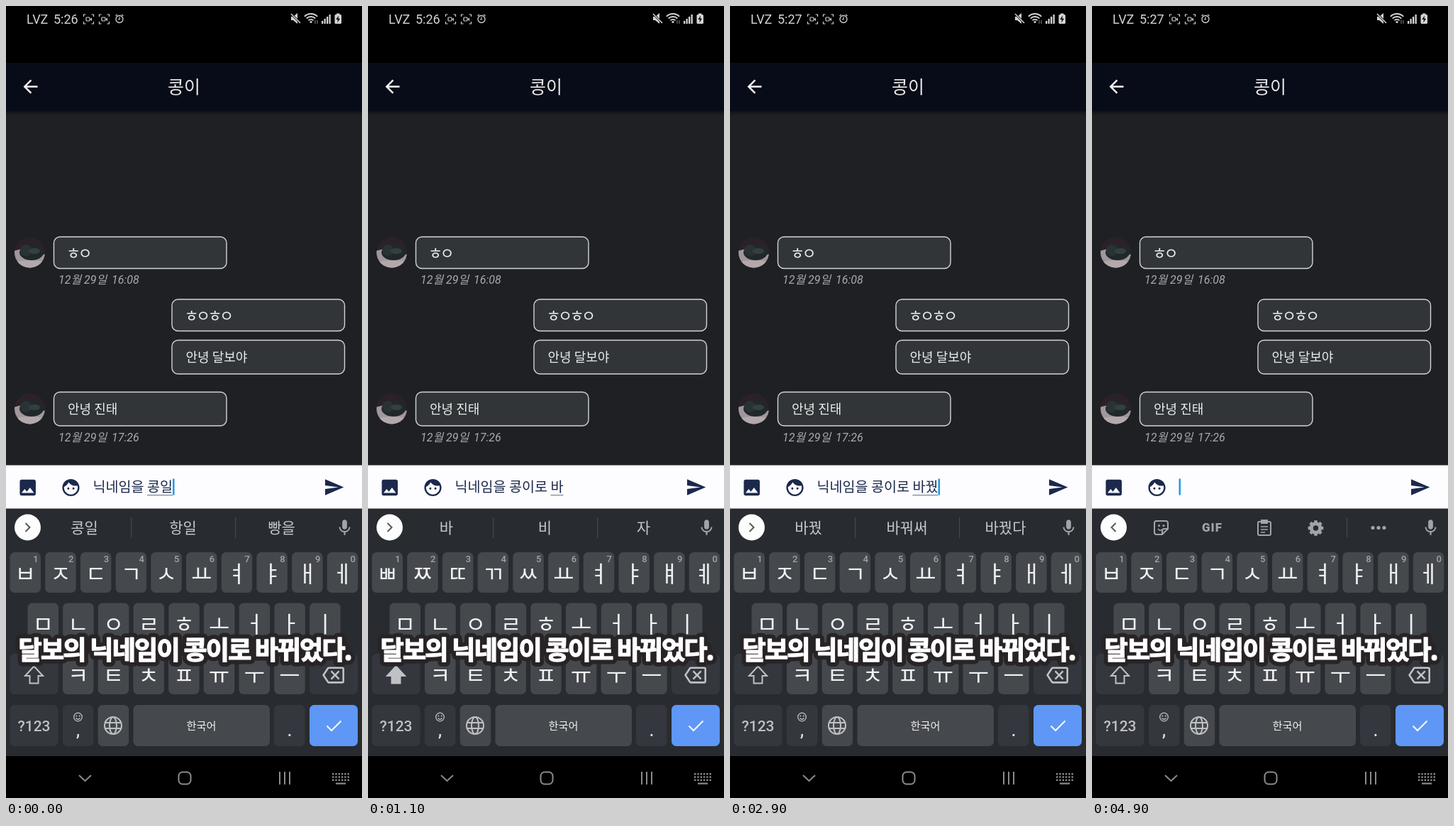
An HTML page with a canvas that plays this animation: 502x1115 px, repeating every 5000 ms.

```html
<!DOCTYPE html>
<html lang="ko">
<head>
<meta charset="utf-8">
<style>
  html, body { margin: 0; width: 100%; height: 100%; overflow: hidden; background: #000; }
  canvas { display: block; }
</style>
</head>
<body>
<canvas id="stage" width="502" height="1115"></canvas>
<script>
const g = document.getElementById('stage').getContext('2d');
const KR = '"Noto Sans CJK KR", "Noto Sans CJK", sans-serif';
const LATIN = 'Roboto, ' + KR;
const NAVY = '#1c294c', PALE = '#bfc1c5', DIM = '#a2a4a9';
const TAU = Math.PI * 2;

// Material-style glyphs on a 24 unit grid
const ICONS = {
  back: 'M20 11H7.83l5.59-5.59L12 4l-8 8 8 8 1.41-1.41L7.83 13H20v-2z',
  send: 'M2.01 21L23 12 2.01 3 2 10l15 2-15 2z',
  image: 'M21 19V5c0-1.1-.9-2-2-2H5c-1.1 0-2 .9-2 2v14c0 1.1.9 2 2 2h14c1.1 0 2-.9 2-2zM8.5 13.5l2.5 3.01L14.5 12l4.5 6H5l3.5-4.5z',
  face: 'M9 11.75c-.69 0-1.25.56-1.25 1.25s.56 1.25 1.25 1.25 1.25-.56 1.25-1.25-.56-1.25-1.25-1.25zm6 0c-.69 0-1.25.56-1.25 1.25s.56 1.25 1.25 1.25 1.25-.56 1.25-1.25-.56-1.25-1.25-1.25zM12 2C6.48 2 2 6.48 2 12s4.48 10 10 10 10-4.48 10-10S17.52 2 12 2zm0 18c-4.41 0-8-3.59-8-8 0-.29.02-.58.05-.86 2.36-1.05 4.23-2.98 5.21-5.37C11.07 8.33 14.05 10 17.42 10c.78 0 1.53-.09 2.25-.26.21.71.33 1.47.33 2.26 0 4.41-3.59 8-8 8z',
  erase: 'M22 3H7c-.69 0-1.23.35-1.59.88L0 12l5.41 8.11c.36.53.9.89 1.59.89h15c1.1 0 2-.9 2-2V5c0-1.1-.9-2-2-2zm0 16H7.07L2.4 12l4.66-7H22v14zm-11.59-2L14 13.41 17.59 17 19 15.59 15.41 12 19 8.41 17.59 7 14 10.59 10.41 7 9 8.41 12.59 12 9 15.59z',
  mic: 'M12 14c1.66 0 3-1.34 3-3V5c0-1.66-1.34-3-3-3S9 3.34 9 5v6c0 1.66 1.34 3 3 3zm5.3-3c0 3-2.54 5.1-5.3 5.1S6.7 14 6.7 11H5c0 3.41 2.72 6.23 6 6.72V21h2v-3.28c3.28-.48 6-3.3 6-6.72h-1.7z'
};
const ROWS = [
  { x: 5.5, y: 769, keys: 'ㅂㅈㄷㄱㅅㅛㅕㅑㅐㅔ', shifted: 'ㅃㅉㄸㄲㅆㅛㅕㅑㅒㅖ' },
  { x: 30.5, y: 840.5, keys: 'ㅁㄴㅇㄹㅎㅗㅓㅏㅣ' },
  { x: 80, y: 912, keys: 'ㅋㅌㅊㅍㅠㅜㅡ' }
];

// [time, committed text, word being composed, suggestions]
const SAID = '닉네임을 ', NAMED = SAID + '콩이로 ';
const TYPING = [
  [0, SAID, '콩일', '콩일 항일 빵을'],
  [200, SAID, '콩이로', '콩이로 항이로 빵으로'],
  [400, NAMED, '', ''],
  [500, NAMED, 'ㅂ', 'ㅂ ㅈ ㅂㅂ'],
  [600, NAMED, '바', '바 비 자'],
  [1400, NAMED, '밖', '밖 박 밖에'],
  [2100, NAMED, '바꾸', '바꾸 자꾸 바꿀'],
  [2600, NAMED, '바꿔', '바꿔 바꿔서 바꿔야'],
  [2900, NAMED, '바꿨', '바꿨 바꿔써 바꿨다'],
  [3200, NAMED, '바꿨ㄱ', '바꿨ㄱ 바꿨 바꿔써'],
  [3500, NAMED, '바꿨구', '바꿨구 바꿨고 바꿨구나'],
  [3600, NAMED, '바꿨군', '바꿨군 바꿨구나 바꿨군요'],
  [3800, NAMED, '바꿨구나', '바꿨구나 바꿨더니']
];
const PRESSES = [[100, 'ㅗ'], [500, 'ㅂ'], [600, 'ㅏ'], [1300, 'ㄲ'], [2000, 'ㅜ'], [2500, 'ㅓ'],
  [2800, 'ㅆ'], [3100, 'ㄱ'], [3400, 'ㅜ'], [3500, 'ㄴ'], [3700, 'ㅏ']];
const SENT = 4100;

const within = (t, a, b) => t >= a && t < b;

function rect(x, y, w, h, color) {
  g.fillStyle = color;
  g.fillRect(x, y, w, h);
}
function box(x, y, w, h, r, fill, line, width = 1.4) {
  g.beginPath();
  g.roundRect(x, y, w, h, r);
  if (fill) { g.fillStyle = fill; g.fill(); }
  if (line) { g.strokeStyle = line; g.lineWidth = width; g.stroke(); }
}
function oval(x, y, rx, ry, fill, line, width = 1.5) {
  g.beginPath();
  g.ellipse(x, y, rx, ry, 0, 0, TAU);
  if (fill) { g.fillStyle = fill; g.fill(); }
  if (line) { g.strokeStyle = line; g.lineWidth = width; g.stroke(); }
}
function stroke(path, color, width) {
  g.strokeStyle = color;
  g.lineWidth = width;
  g.stroke(new Path2D(path));
}
function fill(path, color) {
  g.fillStyle = color;
  g.fill(new Path2D(path));
}
function text(s, x, y, font, color, align = 'left', spacing = 0) {
  g.font = font;
  g.letterSpacing = spacing + 'px';
  g.fillStyle = color;
  g.textAlign = align;
  g.fillText(s, x, y);
}
function icon(name, cx, cy, size, color) {
  g.save();
  g.translate(cx - size / 2, cy - size / 2);
  g.scale(size / 24, size / 24);
  fill(ICONS[name], color);
  g.restore();
}

function statusBar(t) {
  const c = '#d4d4d4';
  text('LVZ', 29, 25, '18px ' + LATIN, c);
  text(t < 1800 ? '5:26' : '5:27', 67, 25, '18px ' + LATIN, c);
  [109.5, 131.5].forEach((x, i) => {
    stroke(`M${x} 15v-3h3m8 0h3v3m0 7v3h-3m-8 0h-3v-3`, c, 1.2);
    if (i || !within(t % 1000, 350, 850)) {
      box(x + 3.5, 16, 5, 5, 1, null, c, 1.2);
      fill(`M${x + 9} 18.5l2.5-2v5z`, c);
    }
  });
  oval(160, 18.5, 5, 5, null, c, 1.3);
  stroke('M160 15.5v3.5h-2M154.5 14l2.5-2M165.5 14l-2.5-2', c, 1.2);
  fill('M402 15h3l6-5v15l-6-5h-3z', c);
  stroke('M401 10l14 14', '#000', 3);
  stroke('M402 11l13 13', c, 1.5);
  [13, 9, 5].forEach(r => {
    g.beginPath();
    g.arc(430, 24, r, -2.35, -0.79);
    g.strokeStyle = c;
    g.lineWidth = 1.8;
    g.stroke();
  });
  oval(430, 22.5, 1.6, 1.6, c);
  stroke('M436 25v-5m3 0v5', '#888', 1);
  for (let i = 0; i < 4; i++) rect(445 + i * 3.5, 21 - i * 3, 2.3, 4 + i * 3, c);
  box(463.5, 12, 9.5, 13, 1.5, c);
  rect(466, 10.5, 4.5, 2, c);
  fill('M469 13.5l-3.7 5.5h2.6l-.7 4.5 3.9-5.8h-2.6z', '#000');
}

function avatar(y) {
  g.save();
  g.beginPath();
  g.arc(33.5, y, 21.5, 0, TAU);
  g.clip();
  rect(10, y - 23, 48, 46, '#2a2228');
  g.translate(0, y);
  fill('M10 -2L22 -5L46 4L58 2V24H10z', '#a0979b');
  fill('M10 14Q33 8 58 14V24H10z', '#b3a9ad');
  oval(36, 0, 17, 11, '#20282b');
  oval(28, -3, 8, 8, '#293235');
  oval(40, -2, 8, 4, '#343f41');
  g.restore();
}

function bubble(x, y, h, message) {
  const jamo = /^[ㄱ-ㅎ]+$/.test(message);
  box(x, y, 243.5, h, 8.5, '#313538', '#d2d4d4');
  if (jamo) text(message, x + 17.5, y + h / 2 + 9, '22px ' + KR, '#eceded', 'left', -3.7);
  else text(message, x + 19.5, y + h / 2 + 7, '18px ' + KR, '#eceded');
}

function stamp(time, y) {
  const font = 'italic 16px ' + LATIN;
  text('12월 29일', 74, y, font, '#a9aaad');
  text(time, 149, y, font, '#a9aaad');
}

function chat() {
  rect(0, 80, 502, 68, '#080c18');
  rect(0, 148, 502, 499, '#1f2024');
  const shade = g.createLinearGradient(0, 148, 0, 154);
  shade.addColorStop(0, '#121318');
  shade.addColorStop(1, '#1f2024');
  rect(0, 148, 502, 6, shade);
  icon('back', 34.5, 113.5, 30, '#f4f4f5');
  text('콩이', 251, 123, '25px ' + KR, '#e9eaec', 'center');
  avatar(347);
  avatar(567);
  bubble(67.5, 325, 44.5, 'ㅎㅇ');
  bubble(234, 413, 44.5, 'ㅎㅇㅎㅇ');
  bubble(234, 470.5, 47.5, '안녕 달보야');
  bubble(67.5, 543.5, 47.5, '안녕 진태');
  stamp('16:08', 391);
  stamp('17:26', 613);
}

function inputBar(t, [edited, done, word]) {
  rect(0, 646.5, 502, 61, '#fdfcfe');
  if (within(t, 3900, 4300)) {
    g.save();
    g.beginPath();
    g.rect(0, 646.5, 502, 61);
    g.clip();
    const p = (t - 3900) / 400;
    oval(462, 677, 36 + 10 * p, 36 + 10 * p, `rgba(0,0,0,${0.02 + 0.06 * Math.sin(Math.PI * p)})`);
    g.restore();
  }
  icon('image', 30.7, 678, 30, NAVY);
  icon('face', 91.5, 678, 29, NAVY);
  icon('send', 462.5, 677.5, 30, NAVY);
  let caret = 122.5;
  if (t < SENT) {
    text(done + word, caret, 684, '19.6px ' + KR, NAVY);
    const start = caret + g.measureText(done).width;
    caret += g.measureText(done + word).width;
    if (word) rect(start, 688, caret - start, 1.2, '#7a849b');
  }
  if ((t - edited) % 1000 < 500) rect(caret, 665.5, 2.5, 23, '#1d9be2');
}

function toolbar() {
  const c = DIM;
  stroke('M104 725H91q-3 0-3 3v13q0 3 3 3h8l8-8v-8q0-3-3-3M99 744v-5q0-3 3-3h5', c, 2);
  oval(94.5, 731.5, 1.5, 1.5, c);
  oval(101, 731.5, 1.5, 1.5, c);
  stroke('M93 736q3 4 6 1', c, 1.6);
  text('GIF', 169.5, 740, '900 17px ' + LATIN, c, 'center', 1);
  box(234, 726, 18, 19, 2, null, c, 2);
  rect(238, 723, 10, 6, c);
  stroke('M238 733h10m-10 4h10m-10 4h6', c, 1.6);
  oval(315.5, 735, 6.2, 6.2, null, c, 5);
  for (let i = 0; i < 8; i++) {
    const a = i * TAU / 8;
    stroke(`M${315.5 + 8 * Math.cos(a)} ${735 + 8 * Math.sin(a)}L${315.5 + 10.8 * Math.cos(a)} ${735 + 10.8 * Math.sin(a)}`, c, 4.5);
  }
  rect(359, 720, 1.2, 28, '#44474c');
  [396, 404, 412].forEach(x => oval(x, 734.5, 2.6, 2.6, c));
}

function suggestionBar(t, words) {
  const sent = t >= SENT;
  oval(30.5, 734, 18.5, 18.5, '#fdfdfd');
  stroke(sent ? 'M33.5 728l-6 6 6 6' : 'M27.5 728l6 6-6 6', '#55585d', 2);
  icon('mic', 477.5, 734.5, 27, DIM);
  if (sent) return toolbar();
  if (!words) return;
  words.split(' ').forEach((w, i) => text(w, 110.5 + 139 * i, 742, '21px ' + KR, '#c6c8cc', 'center'));
  [176, 323].forEach(x => rect(x, 720, 1.2, 29, '#44474c'));
}

function keyboard(t) {
  const KEY = '#45484c', DARK = '#34373d', JAMO = '500 32px ' + KR;
  const shifted = within(t, 900, 1400) || within(t, 2700, 2900);
  const pressed = PRESSES.find(([at]) => within(t, at, at + 100));
  let popup;
  ROWS.forEach((row, r) => {
    const keys = shifted && row.shifted || row.keys;
    [...keys].forEach((key, i) => {
      const x = row.x + 49.7 * i, cx = x + 21.75;
      box(x, row.y, 43.5, 57, 6.5, KEY);
      text(key, cx, row.y + 41.5, JAMO, '#f0f1f2', 'center');
      if (!r) text((i + 1) % 10, x + 36.5, 783, '500 13px ' + LATIN, DIM, 'center');
      if (pressed && pressed[1] === key) popup = { key, cx, y: row.y };
    });
  });
  box(5.5, 912, 68, 57, 6.5, DARK);
  const arrow = 'M39.5 929.5L27 943h6.5v10.5h12V943H52z';
  if (shifted) fill(arrow, PALE);
  stroke(arrow, PALE, 2);
  box(428, 912, 68, 57, 6.5, DARK);
  icon('erase', 461.5, 942, 31, PALE);

  box(5.5, 984, 68, 58, 6.5, DARK);
  text('?123', 39.5, 1021, '500 21px ' + LATIN, PALE, 'center');
  box(80, 984, 43.5, 58, 6.5, DARK);
  oval(101.5, 1001, 5.8, 5.8, null, PALE, 1.3);
  oval(99.3, 999.5, 1, 1, PALE);
  oval(103.7, 999.5, 1, 1, PALE);
  stroke('M98.5 1002.5q3 3.5 6 0', PALE, 1.3);
  text(',', 101.5, 1028, '500 23px ' + LATIN, '#e4e5e7', 'center');
  box(129.7, 984, 43.5, 58, 6.5, KEY);
  oval(151, 1013, 12, 12, null, PALE, 2);
  oval(151, 1013, 5, 12, null, PALE, 2);
  stroke('M140 1009h22m-22 8h22', PALE, 2);
  box(179.5, 984, 192.5, 58, 6.5, within(t, 300, 400) ? '#5a5d62' : KEY);
  text('한국어', 275.5, 1018.5, '15.2px ' + KR, '#eeeff0', 'center');
  box(378, 984, 43.5, 58, 6.5, DARK);
  text('.', 400, 1028, '500 23px ' + LATIN, '#e4e5e7', 'center');
  box(428, 984, 68, 58, 6.5, '#5e97f6');
  stroke('M452.5 1013.5l6.5 6.5 13.5-13.5', '#fff', 2);

  if (popup) {
    box(popup.cx - 25, popup.y - 86.5, 50, 143, 6, '#34373e');
    text(popup.key, popup.cx, popup.y - 38.5, JAMO, '#f0f1f2', 'center');
  }
}

function navBar() {
  const c = '#8b8b8b';
  rect(0, 1056, 502, 59, '#000');
  stroke('M103 1083l8.5 8 8.5-8', c, 2);
  box(243.5, 1078.5, 17, 17, 5.5, null, c, 2);
  [386, 393, 400].forEach(x => rect(x - 1, 1078, 2, 18, c));
  for (let r = 0; r < 3; r++)
    for (let i = 0; i < 6; i++) rect(460 + i * 4.3, 1080 + r * 4.3, 2.4, 2.4, c);
  rect(465, 1093.5, 14, 2.2, c);
}

// White outline thickens the bold face to a black weight
function caption() {
  const line = '달보의 닉네임이 콩이로 바뀌었다.', x = 17.5, y = 920;
  g.save();
  g.letterSpacing = '-1.7px';
  g.font = '900 36px ' + KR;
  g.textAlign = 'left';
  g.lineJoin = 'round';
  for (const [color, width] of [['#282426', 13], ['#fff', 1.4]]) {
    g.strokeStyle = color;
    g.lineWidth = width;
    g.strokeText(line, x, y);
  }
  g.fillStyle = '#fff';
  g.fillText(line, x, y);
  g.restore();
}

function draw(now) {
  const t = Math.floor(now % 5000 / 100) * 100;
  const state = TYPING.findLast(([at]) => t >= at);
  rect(0, 0, 502, 1115, '#000');
  statusBar(t);
  chat();
  rect(0, 707, 502, 349, '#282b30');
  inputBar(t, state);
  suggestionBar(t, state[3]);
  keyboard(t);
  navBar();
  caption();
}

const begin = performance.now();
(function loop() {
  draw(performance.now() - begin);
  requestAnimationFrame(loop);
})();
</script>
</body>
</html>
```
